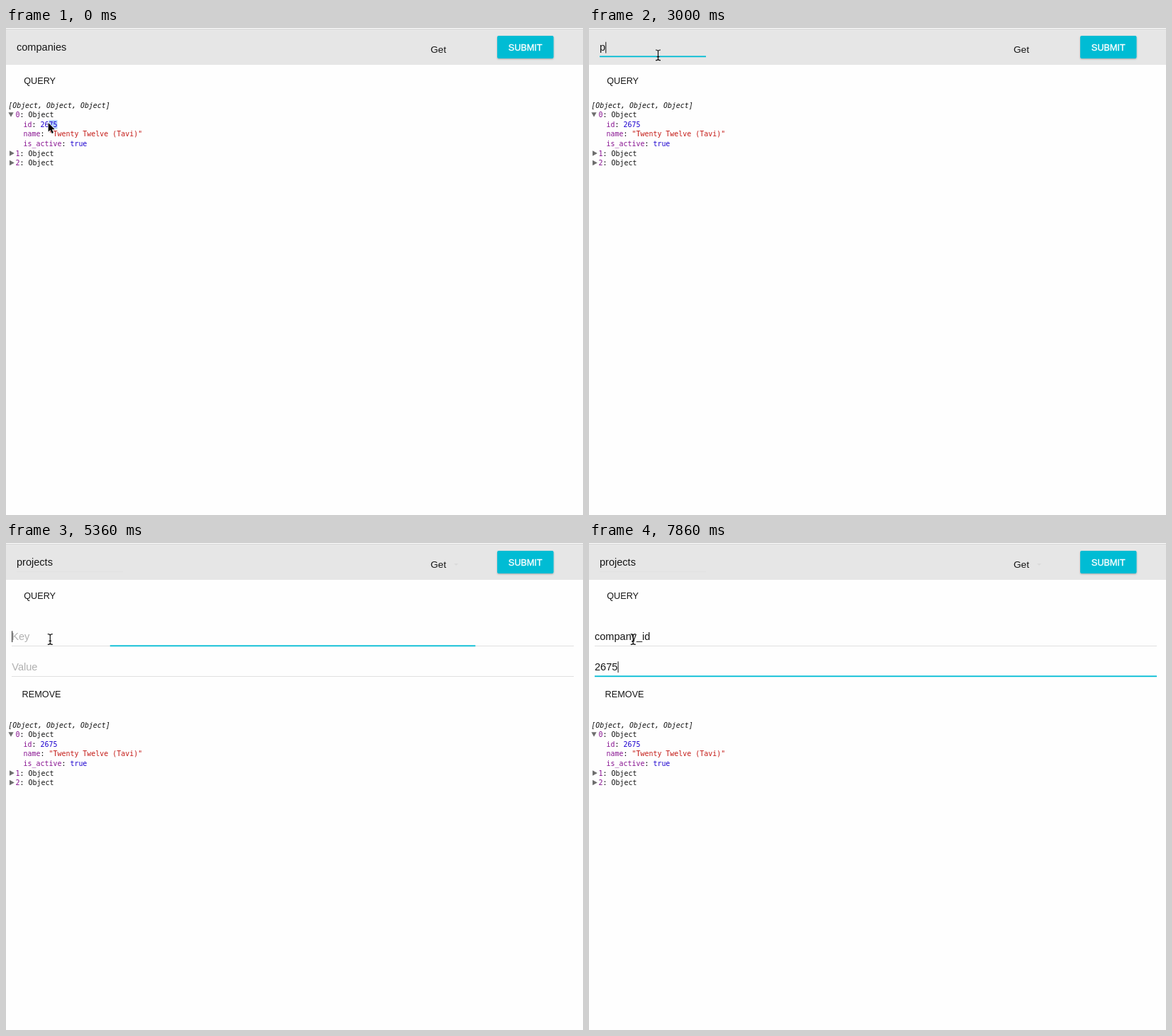
An HTML page for the animation above (8 s loop, 814x688 px).

```html
<!DOCTYPE html>
<html lang="en">
<head>
<meta charset="utf-8">
<title>API console</title>
<style>
  html, body { margin: 0; width: 100%; height: 100%; overflow: hidden; background: #fefefe; }
  svg { display: block; width: 814px; height: 688px; }
  text { font: 14.55px "Liberation Sans", Arial, sans-serif; fill: #161616; white-space: pre; }
  .button { font-size: 12.7px; }
  .hint { fill: #b0b0b0; }
  .console text { font: 9.95px "DejaVu Sans Mono", monospace; fill: #111; }
  .console .italic { font-style: oblique; }
  .key { fill: #881391; }
  .value { fill: #1c00cf; }
  .string { fill: #c41a16; }
  .arrow { fill: #6e6e6e; }
  .accent { fill: #00bcd4; }
</style>
</head>
<body>
<svg viewBox="0 0 814 688">
  <defs>
    <filter id="shadow" x="-10%" y="-20%" width="120%" height="150%">
      <feDropShadow dx="0" dy="1" stdDeviation="1.3" flood-color="#000" flood-opacity=".28"/>
    </filter>
  </defs>
  <rect width="814" height="688" fill="#fefefe"/>
  <rect y="1" width="814" height="51" fill="#e6e6e6"/>
  <rect y="1" width="814" height="1" fill="#d6d6d6"/>
  <text x="599" y="35" style="font-size:13.64px">Get</text>
  <path id="menu" d="M632 29h6l-3 3z" fill="#dadada"/>
  <rect x="693" y="11" width="79.5" height="32" rx="2" class="accent" filter="url(#shadow)"/>
  <text x="708.7" y="31.7" class="button" style="fill:#fff;stroke:#fff;stroke-width:.35">SUBMIT</text>
  <rect id="hover" x="8" y="58" width="79" height="33" rx="2" fill="#999" opacity=".2"/>
  <text x="25.2" y="79.4" class="button">QUERY</text>
  <g id="fields"></g>
  <text id="remove" x="22.6" y="218.3" class="button">REMOVE</text>
  <g id="console" class="console">
    <rect id="selection" y="130" width="0" height="12.5" fill="#b3d4fd"/>
    <path class="arrow" d="M3.4 119.3h7.2l-3.6 6.4z"/>
    <path class="arrow" d="M5 173.3l6.8 3.7-6.8 3.7z"/>
    <path class="arrow" d="M5 186.8l6.8 3.7-6.8 3.7z"/>
    <text class="italic" x="3.2" y="113">[Object, Object, Object]</text>
    <text x="13.6" y="126.4"><tspan class="key">0</tspan>: Object</text>
    <text x="24.6" y="139.9"><tspan class="key">id</tspan>: <tspan class="value">2675</tspan></text>
    <text x="24.6" y="153.4"><tspan class="key">name</tspan>: <tspan class="string">"Twenty Twelve (Tavi)"</tspan></text>
    <text x="24.6" y="167"><tspan class="key">is_active</tspan>: <tspan class="value">true</tspan></text>
    <text x="13.6" y="180.6"><tspan class="key">1</tspan>: Object</text>
    <text x="13.6" y="194.1"><tspan class="key">2</tspan>: Object</text>
  </g>
  <g id="pointer">
    <path id="arrow" d="M0 0v12.6l2.8-2.6 2.3 5 2.2-1-2.2-4.8h4z" fill="#000" stroke="#fff" stroke-width="1.2" paint-order="stroke"/>
    <path id="beam" d="M-3.5-7.3q3 0 3.5 1.6 .5-1.6 3.5-1.6M0-6V6M-3.5 7.3q3 0 3.5-1.6 .5 1.6 3.5 1.6M-1.8 2.4h3.6" fill="none" stroke="#111" stroke-width="1.2"/>
    <g id="hand" fill="#fff" stroke="#111" stroke-width="1.1" stroke-linejoin="round">
      <path d="M-3.2 1.4L-5-5.2q-.2-1.8 1.2-2 1.2 0 1.6 1.4l1.2 3.5q.3-1.4 1.8-1 .9.2 1 1.1 1.2-1 2.4.5 1.6-.6 2.2.9l.5 2.6q.1 2-.9 3.7V7.4H-1.4L-5.6 2.5Q-6.6.9-5.5.2q1.1-.4 2.3 1.2z"/>
      <path d="M-1-2.3l.8 2.4M2-2.2l.4 2.3M4.4-1.7l.2 1.9M.3 2.4v2.6M2.4 2.4v2.6M4.3 2.4v2.6" fill="none" stroke-width=".8"/>
    </g>
  </g>
</svg>
<script>
const LOOP = 8000;
const $ = id => document.getElementById(id);
const NS = "http://www.w3.org/2000/svg";

function add(parent, tag, attrs) {
  const node = parent.appendChild(document.createElementNS(NS, tag));
  for (const name in attrs) node.setAttribute(name, attrs[name]);
  return node;
}

const show = (node, on) => node.setAttribute("visibility", on ? "visible" : "hidden");

// Value of the last [time, value...] entry already reached
function at(t, steps) {
  let now = steps[0];
  for (const step of steps) if (t >= step[0]) now = step;
  return now.slice(1);
}

function makeField(x, width, base, lineY, hint, lineColor) {
  const g = add($("fields"), "g", {});
  const rule = add(g, "rect", { x, y: lineY, width, height: 1, fill: lineColor });
  const accent = add(g, "rect", { y: lineY - .6, height: 1.8, class: "accent" });
  const hintText = add(g, "text", { x: x + .3, y: base, class: "hint" });
  hintText.textContent = hint;
  const text = add(g, "text", { x, y: base });
  const caret = add(g, "rect", { y: base - 12.3, width: 1, height: 15.8, fill: "#111" });
  return { g, rule, draw(value, focus, spread) {
    text.textContent = value;
    hintText.setAttribute("opacity", value ? 0 : 1);
    accent.setAttribute("x", x + width * (1 - spread) / 2);
    accent.setAttribute("width", width * spread);
    caret.setAttribute("x", x + (value ? text.getComputedTextLength() : 0) + .2);
    caret.setAttribute("opacity", focus ? 1 : 0);
  } };
}

const path = makeField(15, 150, 32, 40, "", "#e1e1e1");
const key = makeField(8, 793, 136.6, 145, "Key", "#e0e0e0");
const val = makeField(8, 793, 179.6, 188, "Value", "#e0e0e0");

const pointerSteps = [
  [0, "arrow", 59.7, 134], [150, "arrow", 54, 135], [300, "arrow", 49.5, 135.5], [450, "arrow", 47.5, 135.5],
  [1500, "hand", 91, 61.5], [1650, "beam", 97.5, 38.3],
  [3880, "beam", 95, 43], [4030, "arrow", 90, 53], [4180, "arrow", 88, 54.5],
  [4330, "hand", 68, 71], [4480, "hand", 57, 77],
  [5070, "arrow", 58, 104], [5220, "beam", 62, 133], [5360, "beam", 62.3, 136]
];
const pathSteps = [
  [0, "companies"], [2700, ""], [3000, "p"], [3150, "pr"], [3300, "pro"],
  [3440, "projec"], [3590, "projects"]
];
const keySteps = [
  [0, ""], [5800, "c"], [5950, "co"], [6090, "comp"], [6230, "compan"],
  [6530, "company"], [6820, "company_"], [6970, "company_i"], [7120, "company_id"]
];
const valSteps = [[0, ""], [7560, "2"], [7710, "267"], [7860, "2675"]];

// Accent line opens from its middle and closes back into it
const spread = (t, open, close) => t < close
  ? at(t, [[0, 0], [open, .65], [open + 150, .95], [open + 300, 1]])[0]
  : at(t, [[close, .35], [close + 140, .05], [close + 290, 0]])[0];

function render(t) {
  const [kind, x, y] = at(t, pointerSteps);
  $("pointer").setAttribute("transform", `translate(${x} ${y})`);
  for (const id of ["arrow", "beam", "hand"]) show($(id), id === kind);

  const picked = at(t, [[0, 2], [150, 3], [300, 4], [1950, 0]])[0];
  $("selection").setAttribute("x", 72.5 - picked * 6);
  $("selection").setAttribute("width", picked * 6);

  const panel = t >= 4770;
  show(key.g, panel);
  show(val.g, panel);
  show($("remove"), panel);
  show($("menu"), panel);
  show(path.rule, panel);
  show($("hover"), t >= 4330 && t < 5070);
  $("console").setAttribute("transform", `translate(0 ${panel ? 148 : 0})`);

  path.draw(at(t, pathSteps)[0], t >= 1950 && t < 4630, spread(t, 1950, 4630));
  key.draw(at(t, keySteps)[0], t >= 5360 && t < 7410, spread(t, 5360, 7410));
  val.draw(at(t, valSteps)[0], t >= 7410, spread(t, 7410, LOOP));
}

let start;
function tick(now) {
  start ??= now;
  render((now - start) % LOOP);
  requestAnimationFrame(tick);
}
render(0);
requestAnimationFrame(tick);
</script>
</body>
</html>
```
